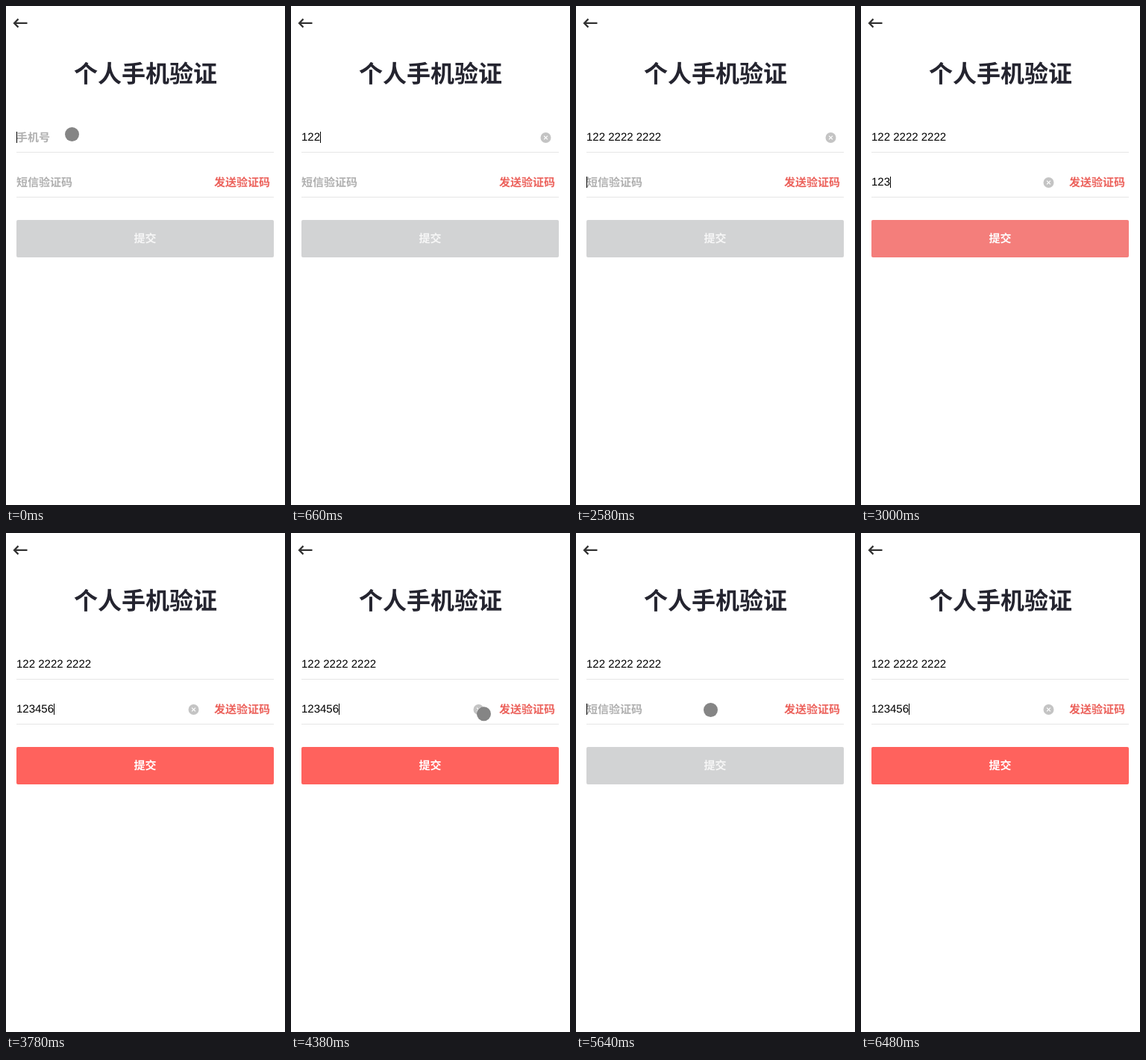
An HTML page with a canvas that plays this animation: 374 px wide and 667 px high, repeating every 6.66 s.

```html
<!DOCTYPE html>
<html lang="zh-CN">
<head>
<meta charset="utf-8">
<title>个人手机验证</title>
<style>
html, body { margin: 0; width: 100%; height: 100%; overflow: hidden; background: #fff; }
canvas { display: block; width: 374px; height: 667px; }
</style>
</head>
<body>
<canvas id="stage"></canvas>
<script>
const W = 374, H = 667, LOOP = 6660, STEP = 60;
const LEFT = 14, RIGHT = 359;
const CJK = '"Noto Sans CJK SC", "Noto Sans CJK", sans-serif';
const TITLE = 'bold 32px ' + CJK, LABEL = 'bold 15px ' + CJK;
const DIGITS = '15px "Liberation Sans", Arial, sans-serif';
const RED = [255, 98, 93], GREY = [210, 211, 212];

const canvas = document.getElementById('stage');
const ctx = canvas.getContext('2d');
const dpr = window.devicePixelRatio || 1;
canvas.width = W * dpr;
canvas.height = H * dpr;

// Each entry: [start time, value]
const PHONE = [
  [0, ''], [240, '1'], [540, '12'], [660, '122'],
  [1020, '1222'], [1080, '122 2'], [1200, '122 22'], [1320, '122 222'], [1440, '122 2222'],
  [1740, '122 22222'], [1800, '122 2222 2'], [1860, '122 2222 22'],
  [2040, '122 2222 222'], [2280, '122 2222 2222']
];
const CODE = [
  [0, ''], [2880, '1'], [2940, '12'], [3000, '123'],
  [3420, '1234'], [3480, '12345'], [3540, '123456'], [4500, ''],
  [5940, '1'], [6000, '12'], [6060, '123'],
  [6360, '1234'], [6420, '12345'], [6480, '123456']
];

const clamp = v => Math.max(0, Math.min(1, v));
const ramp = (t, start, length) => clamp((t - start) / length);
const easeOut = p => 1 - (1 - p) * (1 - p);
const easeInOut = p => p * p * (3 - 2 * p);
const mix = (a, b, p) => a + (b - a) * p;

function valueAt(keys, t) {
  let value = keys[0][1];
  for (const [start, next] of keys) if (t >= start) value = next;
  return value;
}

function text(str, x, y, font, color, align = 'left') {
  ctx.font = font;
  ctx.fillStyle = color;
  ctx.textAlign = align;
  ctx.fillText(str, x, y);
}

function disc(x, y, r, color, alpha = 1) {
  ctx.globalAlpha = alpha;
  ctx.fillStyle = color;
  ctx.beginPath();
  ctx.arc(x, y, r, 0, Math.PI * 2);
  ctx.fill();
  ctx.globalAlpha = 1;
}

function stroke(paths, color, width) {
  ctx.strokeStyle = color;
  ctx.lineWidth = width;
  ctx.beginPath();
  for (const path of paths) {
    path.forEach(([x, y], i) => i ? ctx.lineTo(x, y) : ctx.moveTo(x, y));
  }
  ctx.stroke();
}

function clearIcon(x, y, alpha) {
  if (alpha <= 0) return;
  disc(x, y, 7, '#c4c4c4', alpha);
  ctx.globalAlpha = alpha;
  const d = 2.4;
  stroke([[[x - d, y - d], [x + d, y + d]], [[x + d, y - d], [x - d, y + d]]], '#fff', 1.3);
  ctx.globalAlpha = 1;
}

function field(top, value, hint, caret) {
  ctx.fillStyle = '#e6e6e6';
  ctx.fillRect(LEFT, top + 27, RIGHT - LEFT, 1);
  if (value) text(value, LEFT, top + 12, DIGITS, '#000');
  else text(hint, LEFT, top + 13, LABEL, '#b0b0b0');
  if (!caret) return;
  ctx.font = DIGITS;
  ctx.wordSpacing = '-0.1px';
  const x = Math.floor(LEFT + ctx.measureText(value).width);
  ctx.wordSpacing = '0px';
  ctx.fillStyle = '#000';
  ctx.fillRect(x, top, 1, 15);
}

function button(on) {
  const rgb = GREY.map((c, i) => Math.round(mix(c, RED[i], on)));
  ctx.fillStyle = `rgb(${rgb})`;
  ctx.beginPath();
  ctx.roundRect(LEFT, 286, RIGHT - LEFT, 50, 2);
  ctx.fill();
  const white = Math.round(mix(246, 255, on));
  text('提交', 186.5, 316, LABEL, `rgb(${white},${white},${white})`, 'center');
}

function pointer(t) {
  let x, y, alpha = 1;
  if (t < 240) {
    [x, y] = [88.5, 171.5];
    if (t >= 180) alpha = 0.5;
  } else if (t >= 3840 && t < 5160) {
    const p = easeInOut(ramp(t, 3900, 540));
    x = mix(286.5, 257.5, p);
    y = mix(303.5, 239.5, p);
    alpha = ramp(t, 3780, 120);
  } else if (t >= 5160 && t < 5940) {
    const p = easeInOut(ramp(t, 5100, 300));
    x = mix(257.5, 180.5, p);
    y = mix(239.5, 236.5, p);
  } else return;
  disc(x, y, 9.5, '#858585', alpha);
}

function buttonLevel(t) {
  if (t < 4500) return easeOut(ramp(t, 2880, 240));
  if (t < 5940) return 1 - easeOut(ramp(t, 4500, 180));
  return easeOut(ramp(t, 5940, 240));
}

function codeIconLevel(t) {
  if (t < 4500) return ramp(t, 2820, 120);
  if (t < 5940) return 1 - ramp(t, 4440, 120);
  return ramp(t, 5880, 120);
}

function draw(t) {
  ctx.setTransform(dpr, 0, 0, dpr, 0, 0);
  ctx.textBaseline = 'alphabetic';
  ctx.textRendering = 'geometricPrecision';
  ctx.fillStyle = '#fff';
  ctx.fillRect(0, 0, W, H);

  stroke([[[11, 22.9], [28.5, 22.9]], [[16.5, 17.4], [11, 22.9], [16.5, 28.4]]], '#333', 2.2);
  text('个人手机验证', 187, 102, TITLE, '#24242f', 'center');

  const codeCaret = t >= 2580 && !(t >= 5160 && t < 5580);
  field(168, valueAt(PHONE, t), '手机号', t < 2580);
  field(228, valueAt(CODE, t), '短信验证码', codeCaret);
  text('发送验证码', 279, 241, LABEL, '#ec625c');

  clearIcon(341.5, 176, ramp(t, 180, 120) * (1 - ramp(t, 2580, 120)));
  clearIcon(251.5, 236, codeIconLevel(t));
  button(buttonLevel(t));
  pointer(t);
}

const begin = performance.now();
function tick() {
  const t = (performance.now() - begin) % LOOP;
  draw(Math.floor(t / STEP) * STEP);
  requestAnimationFrame(tick);
}
tick();
</script>
</body>
</html>
```
